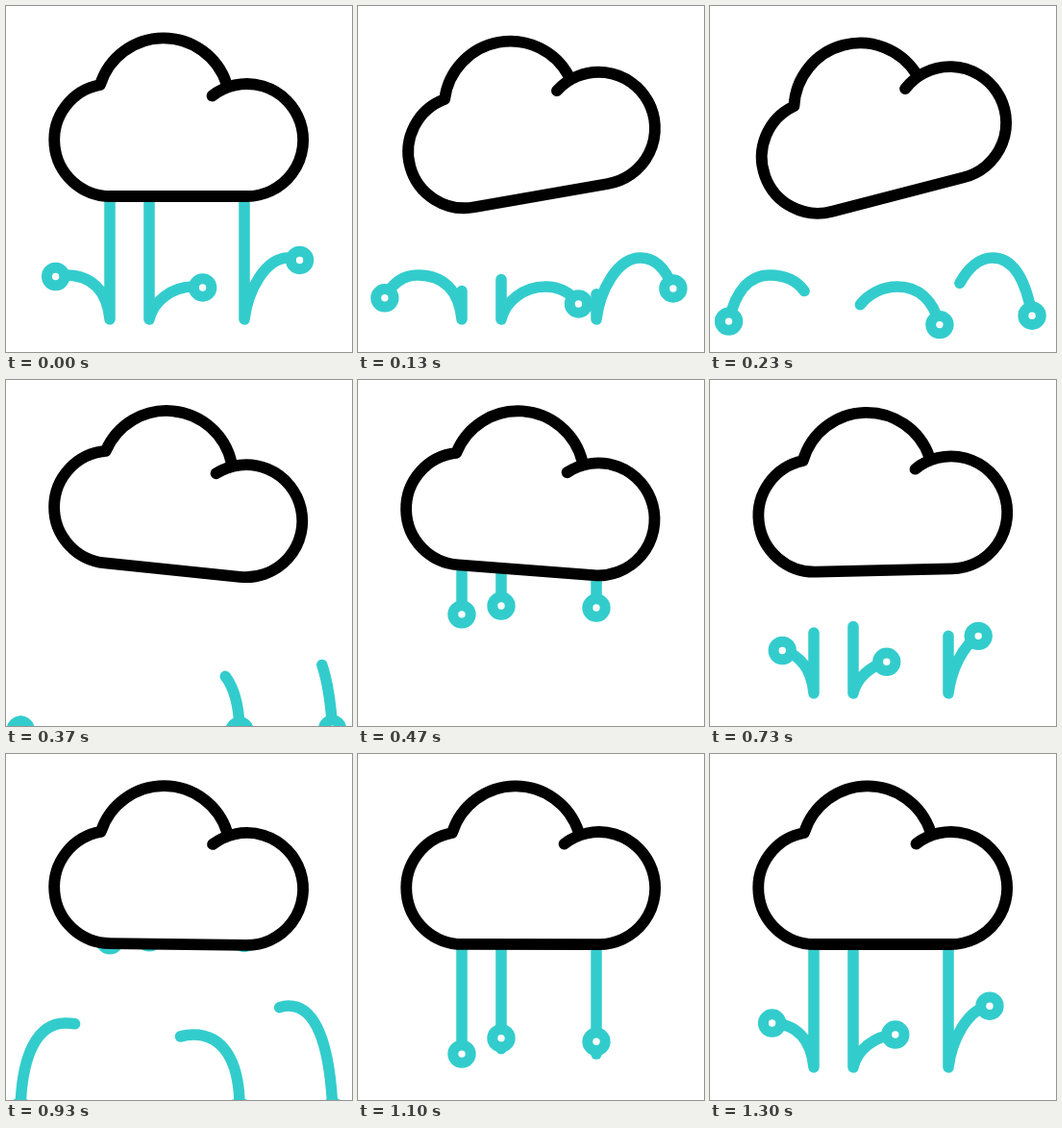
An HTML page for the animation above (1330 ms loop, 360 px wide and 360 px high).

```html
<!DOCTYPE html>
<html lang="en">
<head>
<meta charset="utf-8">
<title>Rain cloud</title>
<style>
  html, body { margin: 0; width: 100%; height: 100%; overflow: hidden; background: #fff; }
  svg { display: block; width: 100vw; height: 100vh; }
  path { stroke-width: 11.5; stroke-linecap: round; stroke-linejoin: round; }
  .trail { fill: none; stroke: #33cccc; }
  .dot { fill: #fff; stroke: #33cccc; stroke-width: 11; }
  #cloud { fill: #fff; stroke: #000; stroke-width: 11.8; }
</style>
</head>
<body>
<svg viewBox="0 0 360 360">
  <g id="rain"></g>
  <path id="cloud" d="M98 82A69 69 0 0 1 229.5 81M98 82A58.5 58.5 0 0 0 109 198H250A58.5 58.5 0 1 0 214.5 93.5"/>
</svg>
<script>
const LOOP = 1330;
const rain = document.getElementById('rain');
const cloud = document.getElementById('cloud');

// Stem, rise, fall and run-out of each lane.
// late: trail delay on the stem; lead: how far the trail is ahead of the dot.
const lanes = [
  { parts: ['M108 166V326', 'C105 295 88 280 62 280', 'C34 280 16 310 15 372', 'V396'], late: 0, lead: 0 },
  { parts: ['M149 166V326', 'C153 308 172 292 195 292', 'C225 292 244 318 243 372', 'V396'], late: 6, lead: 12 },
  { parts: ['M248 166V326', 'C252 295 270 262 294 262', 'C322 262 337 300 340 372', 'V396'], late: 0, lead: 14 }
];

// [time, progress]; each whole unit of progress is one part of the lane.
const drops = [
  {
    start: 375,
    head: [[375, 0], [410, .17], [570, 1], [730, 1.81], [930, 3], [1000, 4]],
    tails: [[.6, 1.86], [.56, 1.77], [.62, 1.88]].map(([a, b]) =>
      [[570, .1], [640, .2], [730, a], [930, b], [1070, 2.75], [1115, 4]])
  },
  {
    start: 880,
    head: [[880, 0], [930, .17], [1121, 1], [1300, 1.96], [1330, 2.09], [1560, 2.61], [1700, 2.92], [1790, 4]],
    tails: [[1.42, 2.84], [1.27, 2.35], [1.46, 2.39]].map(([a, b]) =>
      [[1330, .1], [1360, .2], [1560, a], [1700, b], [1800, 4]])
  }
];

const tilt = [[0, 0], [215, -15], [400, 7.3], [600, -2.8], [900, .8], [1130, 0], [LOOP, 0]];

const linear = p => p;
const smooth = p => p * p * (3 - 2 * p);

function sample(keys, t, ease = linear) {
  if (t <= keys[0][0]) return keys[0][1];
  for (let i = 1; i < keys.length; i++) {
    const [t0, a] = keys[i - 1], [t1, b] = keys[i];
    if (t < t1) return a + (b - a) * ease((t - t0) / (t1 - t0));
  }
  return keys[keys.length - 1][1];
}

function add(tag, attrs) {
  const el = document.createElementNS('http://www.w3.org/2000/svg', tag);
  for (const k in attrs) el.setAttribute(k, attrs[k]);
  return rain.appendChild(el);
}

const items = [];
for (const drop of drops) {
  lanes.forEach((lane, i) => {
    const trail = add('path', { class: 'trail' });
    const marks = [[0, 0]];
    lane.parts.forEach((_, n) => {
      trail.setAttribute('d', lane.parts.slice(0, n + 1).join(''));
      marks.push([n + 1, trail.getTotalLength()]);
    });
    const dot = add('circle', { class: 'dot', r: 9.2 });
    items.push({ drop, lane, trail, dot, marks, tail: drop.tails[i] });
  });
}

function drawDrop({ drop, lane, trail, dot, marks, tail }, time) {
  const t = time < drop.start ? time + LOOP : time;
  const head = sample(drop.head, t);
  const reach = sample(marks, head);
  const stem = marks[1][1];
  // The lag grows down the stem and is made up early in the rise.
  const lag = sample([[0, 0], [stem, 1], [stem + 40, 0]], reach);
  const end = reach - lane.late * lag;
  const from = sample(marks, sample(tail, t));
  const at = trail.getPointAtLength(end - lane.lead * lag);

  trail.style.display = end > from ? '' : 'none';
  trail.setAttribute('stroke-dasharray', `${Math.max(.01, end - from)} 2000`);
  trail.setAttribute('stroke-dashoffset', -from);
  dot.style.display = head > 0 && head < 4 ? '' : 'none';
  dot.setAttribute('cx', at.x);
  dot.setAttribute('cy', at.y);
}

function frame() {
  const t = performance.now() % LOOP;
  items.forEach(item => drawDrop(item, t));
  cloud.setAttribute('transform', `rotate(${sample(tilt, t, smooth)} 180 134.5)`);
  requestAnimationFrame(frame);
}
frame();
</script>
</body>
</html>
```
